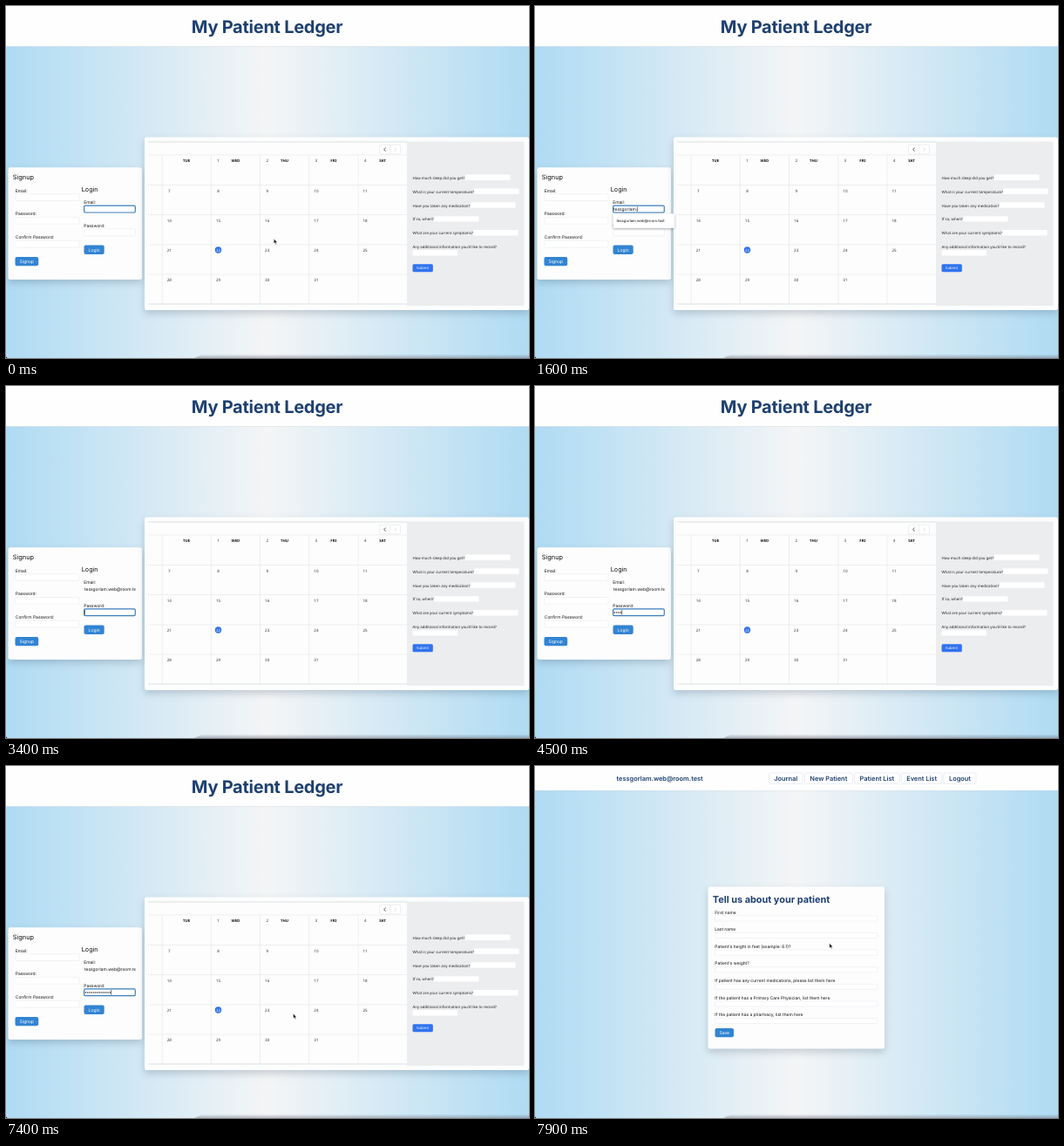
Write an HTML page that moves like this. It is 600 px wide and 404 px high and loops after 8 s.

```html
<!DOCTYPE html>
<html lang="en">
<head>
<meta charset="utf-8">
<title>Patient journal</title>
<style>
  html, body { margin: 0; width: 100%; height: 100%; overflow: hidden; background: #fff; }
  svg { display: block; width: 600px; height: 404px; text-rendering: geometricPrecision; }
  text { font-family: Inter, "Open Sans", sans-serif; white-space: pre; }
  .noto { font-family: "Noto Sans", "Open Sans", sans-serif; }
  .card { filter: drop-shadow(0 4px 4px rgba(40, 60, 80, .22)); }
  .bar { filter: drop-shadow(0 .6px .7px rgba(40, 60, 80, .35)); }
  .menu { filter: drop-shadow(0 1px 1.5px rgba(0, 0, 0, .3)); }
</style>
</head>
<body>
<svg viewBox="0 0 600 404">
  <defs>
    <linearGradient id="sky">
      <stop offset="0" stop-color="#afdbf3"/>
      <stop offset=".5" stop-color="#f4f5f6"/>
      <stop offset="1" stop-color="#afdbf3"/>
    </linearGradient>
    <linearGradient id="dock" x2="0" y2="1">
      <stop offset="0" stop-color="#667" stop-opacity="0"/>
      <stop offset="1" stop-color="#667" stop-opacity=".45"/>
    </linearGradient>
    <clipPath id="emailClip"><rect x="89.5" y="228" width="59" height="10"/></clipPath>
  </defs>
  <rect width="600" height="404" fill="url(#sky)"/>
  <path d="M216 404L226 399.5H600V404Z" fill="url(#dock)"/>
  <path d="M0 402.5L1.5 404H0Z"/>
  <g id="home"></g>
  <g id="patient"></g>
  <path id="pointer" d="M0 0V5.4L1.3 4.3L2.2 6.3L3.1 5.9L2.2 4H3.9Z" fill="#111" stroke="#fff" stroke-width=".4"/>
</svg>
<script>
const LOOP = 8000;
const EMAIL = "tessgorlam.web@room.test";
const NAVY = "#1e4070", INK = "#111", BLUE = "#3284d2";
const $ = id => document.getElementById(id);

function add(parent, tag, attrs, content = "") {
  const el = document.createElementNS("http://www.w3.org/2000/svg", tag);
  for (const key in attrs) el.setAttribute(key, attrs[key]);
  el.textContent = content;
  return parent.appendChild(el);
}
const box = (p, x, y, x2, y2, fill, more = {}) =>
  add(p, "rect", { x, y, width: x2 - x, height: y2 - y, fill, ...more });
const label = (p, x, y, size, content, more = {}) =>
  add(p, "text", { x, y, "font-size": size, fill: INK, ...more }, content);
const line = (p, d, stroke = "#e7e8ea", width = .7) =>
  add(p, "path", { d, stroke, "stroke-width": width, fill: "none" });
const middle = { "text-anchor": "middle" };

function field(p, x, y, x2, y2) {
  return box(p, x, y, x2, y2, "#fff", { rx: 1, stroke: "#e8ebee", "stroke-width": .6 });
}
function button(p, x, y, x2, y2, content) {
  box(p, x, y, x2, y2, BLUE, { rx: 2 });
  label(p, (x + x2) / 2, y + 7.1, 5, content, { ...middle, fill: "#fff" });
}

function buildCalendar(p) {
  box(p, 163, 156, 460, 342.5, "#fdfdfd");
  line(p, "M163 156H460M163 342H460", "#d9dcde", .9);
  for (const y of [171, 205.5, 239.5, 274, 308]) line(p, `M163 ${y}H460`);
  box(p, 428.5, 159.3, 452.5, 170, "#fff", { rx: 2, stroke: "#dfe2e5", "stroke-width": .6 });
  line(p, "M440.5 159.3V170", "#dfe2e5", .6);
  line(p, "M435.5 162.6L433.7 164.7L435.5 166.8", "#333", .8);
  line(p, "M445.7 162.6L447.5 164.7L445.7 166.8", "#ccc", .6);
  ["TUE", "WED", "THU", "FRI", "SAT"].forEach((day, col) => {
    const x = 179.2 + col * 56.2;
    line(p, `M${x} 171V342`);
    label(p, x + 28, 179.4, 4.3, day, { ...middle, class: "noto", "font-weight": 700 });
    for (let row = 0; row < 5; row++) {
      const date = row * 7 + col;
      if (date < 1 || date > 31) continue;
      const y = row ? 179.3 + row * 34.2 : 179.4, today = date === 22;
      if (today) add(p, "circle", { cx: x + 8.1, cy: y - 1.9, r: 3.7, fill: "#2d6fe8" });
      label(p, x + 8.1, y, 4.5, date, { ...middle, class: "noto", fill: today ? "#fff" : "#333" });
    }
  });
}

function buildSurvey(p) {
  box(p, 460, 155.5, 594.5, 344, "#ecedef");
  const questions = [
    ["How much sleep did you get?", 527], ["What is your current temperature?", 537],
    ["Have you taken any medication?", 533], ["If so, when?", 491],
    ["What are your current symptoms?", 536], ["Any additional information you'd like to record?", 466.5]
  ];
  questions.forEach(([question, x], i) => {
    const y = 198.8 + i * 15.88, top = y + (i === 5 ? 2 : -5.2);
    box(p, x, top, x + 51.5, top + 6.3, "#fff", { rx: .6 });
    label(p, 466.5, y, 4.35, question, { class: "noto", fill: "#222" });
  });
  box(p, 466.5, 296.2, 489.8, 305.2, "#2f73ee", { rx: 1.5 });
  label(p, 478.1, 302.2, 4.2, "Submit", { ...middle, class: "noto", fill: "#fff" });
}

function buildHome(p) {
  box(p, 0, 0, 600, 46.5, "#fefefe", { class: "bar" });
  label(p, 299.5, 30.8, 20, "My Patient Ledger",
    { ...middle, fill: NAVY, "font-weight": 700, "letter-spacing": -.25 });
  box(p, 2.5, 185.3, 156, 314, "#fdfdfe", { rx: 2.5, class: "card" });
  box(p, 159, 150.5, 600, 349, "#fcfdfd", { rx: 2.5, class: "card" });
  buildCalendar(p);
  buildSurvey(p);

  label(p, 7.8, 199.3, 7.4, "Signup");
  label(p, 86.8, 212.8, 7.2, "Login");
  ["Email:", "Password:", "Confirm Password:"].forEach((name, i) => {
    const y = 213.5 + i * 26.8;
    label(p, 10.8, y, 4.95, name);
    field(p, 10.8, y + 2.2, 84, y + 10);
  });
  button(p, 10.5, 288, 37.2, 298.3, "Signup");
  label(p, 89.3, 227, 4.95, "Email:");
  label(p, 89.3, 253.6, 4.95, "Password:");
  button(p, 89.5, 274.6, 112.7, 285, "Login");

  const emailBox = field(p, 89.5, 229.3, 148.5, 237.1);
  field(p, 89.5, 255.7, 148.5, 263.7);
  const focus = box(p, 89.6, 229.2, 148.3, 237, "#fff", { rx: 1.4, stroke: "#3c7fbd", "stroke-width": 1.2 });
  const email = label(p, 90, 235, 4.92, "", { "clip-path": "url(#emailClip)" });
  const dots = Array.from({ length: 13 }, (_, i) =>
    add(p, "circle", { cx: 91.4 + i * 2.33, cy: 260, r: .75, fill: INK }));
  const caret = line(p, "M0 0V5.6", "#111", .6);
  const menu = add(p, "g", { class: "menu" });
  const option = box(menu, 89.5, 238.2, 160, 255, "#fff", { rx: 1 });
  label(menu, 93.5, 247.8, 4.25, EMAIL);
  return { emailBox, focus, email, dots, caret, menu, option };
}

function buildPatient(p) {
  box(p, 0, 0, 600, 28.2, "#fefefe", { class: "bar" });
  label(p, 93.5, 16.5, 7.4, EMAIL, { fill: NAVY, "font-weight": 600 });
  const links = [["Journal", 268.5, 307], ["New Patient", 309.3, 364.3], ["Patient List", 366.5, 418.2],
    ["Event List", 420.4, 466.8], ["Logout", 469, 506]];
  for (const [name, x, x2] of links) {
    box(p, x, 8, x2, 20.3, "#fff", { rx: 2, stroke: "#dfe6ee", "stroke-width": .7 });
    label(p, (x + x2) / 2, 16.8, 7.4, name, { ...middle, fill: NAVY, "font-weight": 600 });
  }
  box(p, 198.5, 138.5, 401, 324.5, "#fdfdfe", { rx: 2.5, class: "card" });
  label(p, 203.8, 156.8, 10.9, "Tell us about your patient", { fill: NAVY, "font-weight": 700 });
  ["First name", "Last name", "Patient's height in feet (example: 6.1)?", "Patient's weight?",
    "If patient has any current medications, please list them here",
    "If the patient has a Primary Care Physician, list them here",
    "If the patient has a pharmacy, list them here"
  ].forEach((name, i) => {
    const y = 169.6 + i * 19.6;
    label(p, 206.3, y, 4.9, name);
    field(p, 206.5, y + 2.3, 393, y + 8.4);
  });
  button(p, 206.5, 301, 228, 311.3, "Save");
}

const ui = buildHome($("home"));
buildPatient($("patient"));

// Key press times in ms
const emailKeys = [200, 400, 600, 700, 900, 1100, 1200, 1300, 1400, 1400, 1600, 1900, 2100, 2300, 2600];
const passKeys = [4000, 4100, 4300, 4500, 4700, 4900, 5100, 5200, 5400, 5500, 5500, 5700, 5900];
// Pointer tip every 100 ms from 7200
const path = [[312, 272], [324, 281], [329.5, 284.3], [321.3, 280], [321, 262], [327, 238], [333.5, 216], [337.8, 203.5]];

const show = (el, on) => el.setAttribute("visibility", on ? "visible" : "hidden");
const pressed = (keys, t) => keys.filter(k => k <= t).length;

function render(time) {
  const t = Math.floor(time % LOOP / 100) * 100;
  const home = t < 7500, onPassword = t >= 3400, filled = t >= 2800;
  $("home").style.display = home ? "" : "none";
  $("patient").style.display = home ? "none" : "";

  const typed = filled ? EMAIL.length : pressed(emailKeys, t);
  const dotCount = pressed(passKeys, t);
  ui.email.textContent = EMAIL.slice(0, typed);
  ui.dots.forEach((dot, i) => show(dot, i < dotCount));
  show(ui.emailBox, !onPassword);
  ui.focus.setAttribute("y", onPassword ? 255.8 : 229.2);
  show(ui.menu, t >= 1200 && t < 3000);
  ui.option.setAttribute("fill", filled ? "#eef0f2" : "#fff");

  const x = onPassword ? 90.4 + dotCount * 2.33 : 90.2 + (typed ? ui.email.getComputedTextLength() : 0);
  ui.caret.setAttribute("transform", `translate(${x} ${onPassword ? 257 : 230.4})`);
  show(ui.caret, t >= 200 && !(filled && !onPassword) && !(t >= 6400 && t < 6900));

  const [px, py] = t < 200 ? [307.3, 267.3] : path[Math.max(0, (t - 7200) / 100)];
  $("pointer").setAttribute("transform", `translate(${px} ${py})`);
  show($("pointer"), t < 200 || t >= 7200);
}

const start = performance.now();
function tick() {
  render(performance.now() - start);
  requestAnimationFrame(tick);
}
tick();
</script>
</body>
</html>
```
